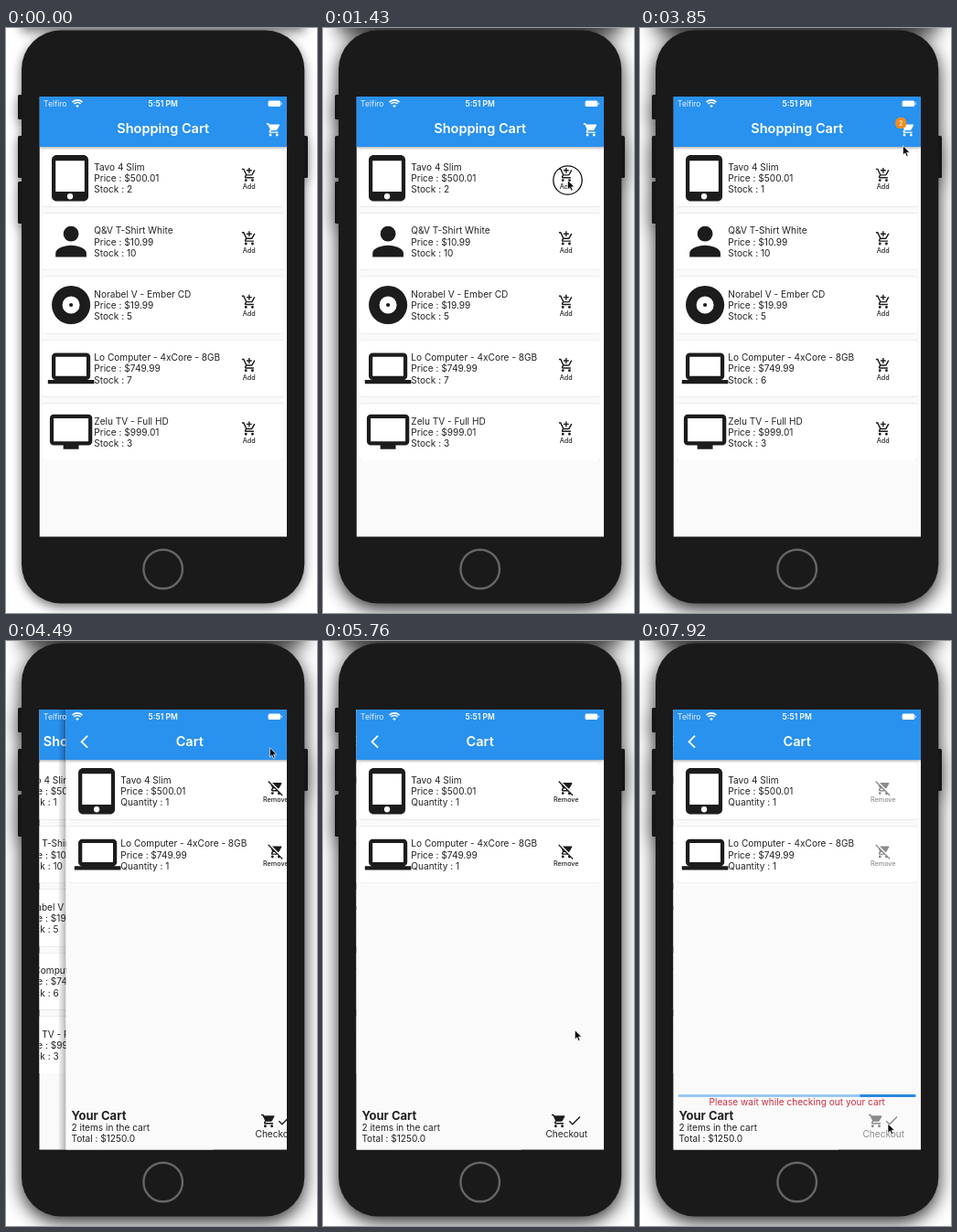
Recreate the animation shown at these times as an HTML page. Size 340 by 640 pixels, loop 8000 ms.

```html
<!DOCTYPE html>
<html lang="en">
<head>
<meta charset="utf-8">
<title>Shopping cart demo</title>
<style>
  html, body { margin: 0; width: 100%; height: 100%; overflow: hidden; background: #fff; }
  svg { display: block; }
  text { font: 10.1px Inter, "Open Sans", sans-serif; fill: #222; }
  .title { font-size: 14.5px; font-weight: 600; fill: #fff; }
  .heading { font-size: 13px; font-weight: 700; }
  .label { font-size: 7.2px; font-weight: 500; }
  .middle { text-anchor: middle; }
  .bar { fill: #2991ee; filter: drop-shadow(0 1.5px 1.5px rgba(0,0,0,.35)); }
  .card { fill: #fff; filter: drop-shadow(0 .8px .7px rgba(0,0,0,.32)); }
  .idle { filter: drop-shadow(0 4px 6px rgba(0,0,0,.55)); }
  .focused { filter: drop-shadow(0 6px 10px rgba(0,0,0,.85)); }
</style>
</head>
<body>
<svg id="stage" width="340" height="640" viewBox="0 0 340 640"></svg>
<script>
const DURATION = 8000, LEFT = 36.5, WIDTH = 270.5;
const CARD_PITCH = 69.4, CARD_CENTER = 164.2;

const ICONS = {
  tablet: 'M18.5 0h-14C3.12 0 2 1.12 2 2.5v19C2 22.88 3.12 24 4.5 24h14c1.38 0 2.5-1.12 2.5-2.5v-19C21 1.12 19.88 0 18.5 0zm-7 23a1.5 1.5 0 1 1 0-3 1.5 1.5 0 0 1 0 3zm7.5-4H4V3h15z',
  person: 'M12 12a4 4 0 1 0 0-8 4 4 0 0 0 0 8zm0 2c-2.67 0-8 1.34-8 4v2h16v-2c0-2.66-5.33-4-8-4z',
  disc: 'M12 2a10 10 0 1 0 0 20 10 10 0 0 0 0-20zm0 14.5a4.5 4.5 0 1 1 0-9 4.5 4.5 0 0 1 0 9zm0-5.5a1 1 0 1 0 0 2 1 1 0 0 0 0-2z',
  laptop: 'M20 18c1.1 0 2-.9 2-2V6c0-1.1-.9-2-2-2H4c-1.1 0-2 .9-2 2v10c0 1.1.9 2 2 2H0v2h24v-2zM4 6h16v10H4z',
  tv: 'M21 3H3c-1.1 0-2 .9-2 2v12c0 1.1.9 2 2 2h5v2h8v-2h5c1.1 0 2-.9 2-2V5c0-1.1-.9-2-2-2zm0 14H3V5h18z',
  add: 'M11 9h2V6h3V4h-3V1h-2v3H8v2h3zM7 18a2 2 0 1 0 0 4 2 2 0 0 0 0-4zm10 0a2 2 0 1 0 0 4 2 2 0 0 0 0-4zm-9.83-3.25l.03-.12.9-1.63h7.45c.75 0 1.41-.41 1.75-1.03l3.86-7.01L19.42 4l-1.11 2-2.76 5H8.53L4.27 2H1v2h2l3.6 7.59-1.35 2.45C4.52 15.38 5.48 17 7 17h12v-2H7.42a.25.25 0 0 1-.25-.25z',
  remove: 'M22.73 22.73L1.27 1.27 0 2.54l4.39 4.39 2.21 4.66-1.35 2.45C4.52 15.38 5.48 17 7 17h7.46l1.38 1.38A2 2 0 1 0 18.62 21.16L21.46 24zM7.42 15a.25.25 0 0 1-.22-.37L8.1 13h2.36l2 2zm8.13-2c.75 0 1.41-.41 1.75-1.03l3.58-6.49A1 1 0 0 0 20 4H6.54zM7 18a2 2 0 1 0 0 4 2 2 0 0 0 0-4z',
  cart: 'M7 18a2 2 0 1 0 0 4 2 2 0 0 0 0-4zM1 2v2h2l3.6 7.59-1.35 2.45C4.52 15.38 5.48 17 7 17h12v-2H7.42a.25.25 0 0 1-.22-.37L8.1 13h7.45c.75 0 1.41-.41 1.75-1.03l3.58-6.49A1 1 0 0 0 20 4H5.21l-.94-2zm16 16a2 2 0 1 0 0 4 2 2 0 0 0 0-4z',
  check: 'M9 16.2L4.8 12l-1.4 1.4L9 19 21 7l-1.4-1.4z',
  back: 'M11.67 3.87L9.9 2.1 0 12l9.9 9.9 1.77-1.77L3.54 12z'
};

const icon = (name, x, y, size = 17.3, fill = '#1c1c1c') =>
  `<path d="${ICONS[name]}" fill="${fill}" transform="translate(${x} ${y}) scale(${size / 24})"/>`;
const text = (x, y, content, attrs = '') => `<text x="${x}" y="${y}" ${attrs}>${content}</text>`;
const rect = (x, y, w, h, attrs = '') => `<rect x="${x}" y="${y}" width="${w}" height="${h}" ${attrs}/>`;

function card(row, { image, name, price }, lastLine, action, label) {
  const c = CARD_CENTER + row * CARD_PITCH;
  return rect(40, c - 31.2, 263, 62.4, 'rx="2.5" class="card"') +
    icon(image, 45.8, c - 25.3, 50.6) +
    text(96.3, c - 8.3, name) + text(96.3, c + 4, 'Price : ' + price) + text(96.3, c + 16.2, lastLine) +
    `<g class="action">${icon(action, 257.2, c - 12)}${text(265.8, c + 12.2, label, 'class="label middle"')}</g>`;
}

const page = (title, content) =>
  rect(LEFT, 75, WIDTH, 482, 'fill="#fafafa"') + content +
  rect(LEFT, 75, WIDTH, 55, 'class="bar"') + text(171.7, 115.3, title, 'class="title middle"');

const products = [
  { image: 'tablet', name: 'Tavo 4 Slim', price: '$500.01', stock: 2 },
  { image: 'person', name: 'Q&amp;V T-Shirt White', price: '$10.99', stock: 10 },
  { image: 'disc', name: 'Norabel V - Ember CD', price: '$19.99', stock: 5 },
  { image: 'laptop', name: 'Lo Computer - 4xCore - 8GB', price: '$749.99', stock: 7 },
  { image: 'tv', name: 'Zelu TV - Full HD', price: '$999.01', stock: 3 }
];

const shop = page('Shopping Cart', products.map((p, i) =>
    card(i, p, `Stock : <tspan id="stock${i}">${p.stock}</tspan>`, 'add', 'Add')).join('')) +
  icon('cart', 284, 102.6, 17.3, '#fff') +
  `<g id="badge">${rect(279.2, 98, 12, 12, 'rx="5" fill="#f08c1e"')}
   <text id="count" x="285.2" y="106.6" class="label middle" style="fill:#fff"></text></g>`;

const cart = rect(LEFT - 9, 75, 9, 482, 'fill="url(#edge)"') +
  page('Cart', [0, 3].map((p, i) => card(i, products[p], 'Quantity : 1', 'remove', 'Remove')).join('')) +
  icon('back', 52.3, 101.5, 17.3, '#fff') +
  text(42.4, 523.6, 'Your Cart', 'class="heading"') +
  text(42.4, 536, '2 items in the cart') + text(42.4, 548.2, 'Total : $1250.0') +
  `<g class="action">${icon('cart', 249.3, 516.3)}${icon('check', 266.3, 516)}
   ${text(266.3, 542.8, 'Checkout', 'class="middle"')}</g>
   <g id="progress">${rect(42, 496, 259.3, 3, 'fill="#97c9f6"')}
   <rect id="line1" y="496" height="3" fill="#2a88e0"/><rect id="line2" y="496" height="3" fill="#2a88e0"/>
   ${text(171.7, 508.4, 'Please wait while checking out your cart', 'class="middle" style="fill:#cc2e40"')}</g>`;

const wifi = [2.6, 5.2, 7.8].map((r, i) => {
  const d = r * 0.7;
  return i ? `<path d="M${78 - d} ${86.6 - d}A${r} ${r} 0 0 1 ${78 + d} ${86.6 - d}" fill="none" stroke="#fff" stroke-width="1.6"/>`
    : `<path d="M78 87l${-d} ${-d}A${r} ${r} 0 0 1 ${78 + d} ${87 - d}z" fill="#fff"/>`;
}).join('');

document.getElementById('stage').innerHTML = `
  <defs>
    <clipPath id="screen">${rect(LEFT, 75, WIDTH, 481.5)}</clipPath>
    <linearGradient id="edge"><stop stop-opacity="0"/><stop offset="1" stop-opacity=".28"/></linearGradient>
  </defs>
  <g id="window">
    ${rect(17, -24, 309, 24, 'fill="#888"')}
    <g fill="#161616">
      ${rect(13, 73, 6, 27, 'rx="1.5"')}${rect(13, 118, 6, 46, 'rx="1.5"')}
      ${rect(13, 168, 6, 46, 'rx="1.5"')}${rect(324, 118, 6, 46, 'rx="1.5"')}
    </g>
    ${rect(17, 2.5, 309.3, 627, 'rx="43" fill="#1a1a1a"')}
  </g>
  <circle cx="171.7" cy="592" r="21.3" fill="none" stroke="#666" stroke-width="2.4"/>
  <g clip-path="url(#screen)">
    <g id="shop">${shop}</g>
    <g id="cart">${cart}</g>
    ${text(41, 86, 'Telfiro', 'style="font-size:8.6px;fill:#e4f1fd"')}${wifi}
    ${text(171.7, 86, '5:51 PM', 'class="middle" style="font-size:8.5px;font-weight:600;fill:#fff"')}
    ${rect(286.6, 79.6, 13.6, 6.4, 'rx="1.6" fill="#fff"')}${rect(300.8, 81.6, 1.1, 2.4, 'rx=".5" fill="#cfe6fb"')}
  </g>
  <g id="pointer">
    <circle id="press" r="15.7" fill="none" stroke="#111" stroke-width="1.3"/>
    <path d="M0 0V11.2l2.6-2.5 1.7 4 1.9-.8-1.7-3.9h3.6z" transform="scale(.92)" stroke="#fff" stroke-width=".8"/>
  </g>`;

const $ = id => document.getElementById(id);
const actions = $('cart').querySelectorAll('.action');
const show = (id, on) => $(id).setAttribute('visibility', on ? 'visible' : 'hidden');
const clamp = v => Math.min(1, Math.max(0, v));

// CSS-style cubic Bézier easing, solved by bisection.
function bezier(x1, y1, x2, y2) {
  const at = (a, b, s) => 3 * (1 - s) ** 2 * s * a + 3 * (1 - s) * s * s * b + s ** 3;
  return x => {
    if (x <= 0 || x >= 1) return clamp(x);
    let lo = 0, hi = 1;
    for (let i = 0; i < 24; i++) {
      const mid = (lo + hi) / 2;
      if (at(x1, x2, mid) < x) lo = mid; else hi = mid;
    }
    return at(y1, y2, lo);
  };
}

const slide = bezier(.35, .91, .33, .97);
const move = bezier(.42, 0, .4, 1);
const line1Head = bezier(.2, 0, .8, 1), line1Tail = bezier(.4, 0, 1, 1);
const line2Head = bezier(0, 0, .65, 1), line2Tail = bezier(.1, 0, .45, 1);

// Pointer stops as [time, x, y].
const route = [
  [850, 350, 330], [1280, 267.5, 166.5], [1750, 267.5, 166.5], [2650, 268.6, 376],
  [3350, 268.6, 376], [3980, 288.4, 116.8], [5100, 288.4, 116.8], [6250, 271, 528]
];
const presses = [[1360, 1510], [3010, 3150], [4130, 4280], [6740, 6890]];
const FOCUS = 1360, ADD_FIRST = 1540, ADD_SECOND = 3180, OPEN_CART = 4310, CHECKOUT = 6953;

function pointerAt(t) {
  const next = route.findIndex(stop => stop[0] > t);
  if (next === 0) return route[0].slice(1);
  if (next < 0) return route[route.length - 1].slice(1);
  const [t0, x0, y0] = route[next - 1], [t1, x1, y1] = route[next];
  const k = move((t - t0) / (t1 - t0));
  return [x0 + (x1 - x0) * k, y0 + (y1 - y0) * k];
}

function setLine(id, tail, head) {
  $(id).setAttribute('x', 42 + 259.3 * tail);
  $(id).setAttribute('width', 259.3 * Math.max(0, head - tail));
}

function draw(t) {
  $('window').setAttribute('class', t < FOCUS ? 'idle' : 'focused');

  const count = (t >= ADD_FIRST) + (t >= ADD_SECOND);
  $('stock0').textContent = count > 0 ? 1 : 2;
  $('stock3').textContent = count > 1 ? 6 : 7;
  $('count').textContent = count;
  show('badge', count > 0);

  const k = slide((t - OPEN_CART) / 400);
  $('shop').setAttribute('transform', `translate(${-k * WIDTH / 3} 0)`);
  $('cart').setAttribute('transform', `translate(${(1 - k) * WIDTH} 0)`);
  $('cart').setAttribute('display', k > 0 ? 'inline' : 'none');

  const busy = t >= CHECKOUT;
  show('progress', busy);
  actions.forEach(a => a.setAttribute('opacity', busy ? .5 : 1));
  if (busy) {
    const p = (t - CHECKOUT) % 1800;
    setLine('line1', line1Tail((p - 333) / 750), line1Head(p / 750));
    setLine('line2', line2Tail((p - 1267) / 533), line2Head((p - 1000) / 567));
  }

  $('pointer').setAttribute('transform', `translate(${pointerAt(t)})`);
  show('press', presses.some(([down, up]) => t >= down && t < up));
}

const start = performance.now();
function frame() {
  draw((performance.now() - start) % DURATION);
  requestAnimationFrame(frame);
}
frame();
</script>
</body>
</html>
```
